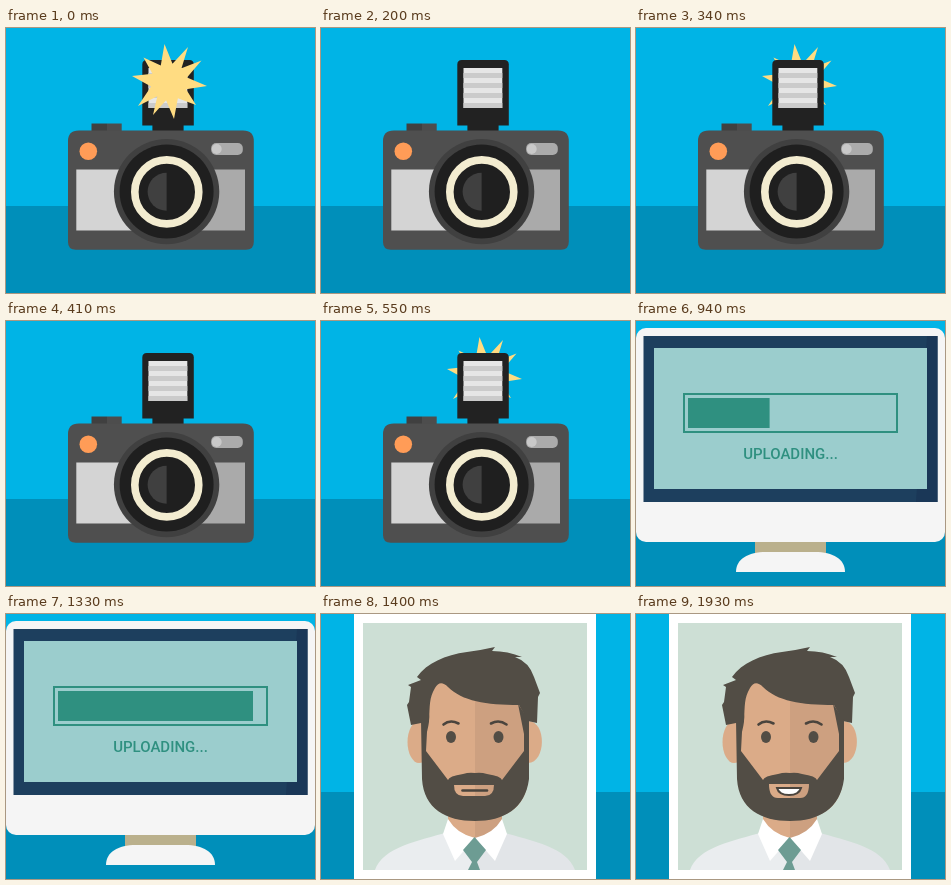
Animation of 309x265 px, one loop 4.1 s. Source, as an HTML page:

```html
<!DOCTYPE html>
<html lang="en">
<head>
<meta charset="utf-8">
<title>Photo upload</title>
<style>
  html, body { margin: 0; width: 100%; height: 100%; overflow: hidden; }
  svg { display: block; width: 100%; height: 100%; }
  text { font: 500 15px Roboto, sans-serif; }
  .line { fill: none; stroke: #4a443d; stroke-width: 2.6; stroke-linecap: round; }
</style>
</head>
<body>
<svg viewBox="0 0 309 265">
  <defs>
    <!-- Two-tone fills that split at x = 154 -->
    <linearGradient id="skin" gradientUnits="userSpaceOnUse" x1="0" x2="308">
      <stop offset=".5" stop-color="#dbab88"/><stop offset=".5" stop-color="#cda080"/>
    </linearGradient>
    <linearGradient id="shirt" gradientUnits="userSpaceOnUse" x1="0" x2="308">
      <stop offset=".5" stop-color="#eaedef"/><stop offset=".5" stop-color="#e2e5e8"/>
    </linearGradient>
  </defs>
  <path fill="#00b4e6" d="M0 0H309V178H0z"/>
  <path fill="#008fba" d="M0 178H309V265H0z"/>

  <g id="camera">
    <polygon class="star" id="starBack" fill="#ffdc82"/>
    <path fill="#222" d="M146.400 92H177.600V104H146.400z"/>
    <path fill="#222" d="M136.300 97.600V36.500Q136.300 32 140.800 32H183.300Q187.800 32 187.800 36.500V97.600z"/>
    <path fill="#e6e6e6" d="M142.500 40H181.300V80H142.500z"/>
    <path fill="#cbcbcb" d="M142.500 45h38.800v5h-38.800zm0 10h38.800v5h-38.800zm0 10h38.800v5h-38.800zm0 10h38.800v5h-38.800z"/>
    <path fill="#404040" d="M85.500 95.500H101V104H85.500z"/>
    <path fill="#4d4d4d" d="M101 95.500H115.700V104H101z"/>
    <path fill="#4f4f4f" d="M62 113Q62 102.400 72.600 102.400H237.200Q247.800 102.400 247.800 113V214Q247.800 221.800 240 221.800H69.800Q62 221.800 62 214z"/>
    <path fill="#d4d4d4" d="M70.300 141.400H160V202.600H70.300z"/>
    <path fill="#aaa" d="M160 141.400H239V202.600H160z"/>
    <circle cx="82.300" cy="123.300" r="8.800" fill="#ff9c57"/>
    <rect x="205.200" y="115" width="31.600" height="12" rx="5" fill="#ababab"/>
    <circle cx="210.700" cy="121" r="5" fill="#c9c9c9"/>
    <circle cx="160.600" cy="163.600" r="52.700" fill="#404040"/>
    <circle cx="160.600" cy="163.600" r="47" fill="#1f1f1f"/>
    <circle cx="160.800" cy="163.900" r="32" fill="#1f1f1f" stroke="#f3ecd0" stroke-width="7.600"/>
    <path fill="#404040" d="M160.600 144.800A19 19 0 0 0 160.600 182.800z"/>
    <polygon class="star" id="starFront" fill="#ffdc82"/>
  </g>

  <g id="monitor">
    <rect y="7" width="309" height="214" rx="10" fill="#f5f5f5"/>
    <path fill="#1d3f5e" d="M7.500 15H301.500V181H7.500z"/>
    <path fill="#1a3757" d="M291 15H301.500V181H280z"/>
    <path fill="#9bcdcd" d="M18 27H291V168H18z"/>
    <path fill="#bab08c" d="M119 221H190V233H119z"/>
    <path fill="#f5f5f5" d="M100 251C100 238 112 231 130 231H179C197 231 209 238 209 251z"/>
    <rect x="48" y="73" width="213" height="38" fill="none" stroke="#2f9080" stroke-width="2"/>
    <rect id="bar" x="52" y="77" height="30" fill="#2f9080"/>
    <text x="154.500" y="138" text-anchor="middle" fill="#2f9080">UPLOADING...</text>
  </g>

  <g id="portrait">
    <path fill="#fff" d="M33 0H275V265H33z"/>
    <path fill="#cddfd5" d="M42 9H266V256H42z"/>
    <path fill="url(#shirt)" d="M54 256C62 233 97 227 127 218H181C211 227 246 233 254 256z"/>
    <path fill="url(#skin)" d="M127 190H181V212L154 226L127 212z"/>
    <path fill="#fff" d="M127 205L122 220L134 247L154 224Q136 220 127 205zM181 205L186 220L174 247L154 224Q172 220 181 205z"/>
    <path fill="#6d9c93" d="M153.500 223L165 236L156 248L159 256H147L151 248L142 236z"/>
    <g fill="url(#skin)">
      <ellipse cx="98" cy="128" rx="11.500" ry="21"/>
      <path fill="#dbab88" d="M207 107C226 107 225 149 207 149z"/>
      <path d="M102 60H207V165C205 195 183 206 154 206C125 206 103 195 102 165z"/>
    </g>
    <g fill="#524d45">
      <path d="M90 111L86 91L88 88L90 73L87 71L100 66L96 63C106 49 124 41 146 38Q161 36 174 33L171 37Q187 37 201 43L194 43Q208 48 213 63L219 79L217 83L216 109L207 107L198 91C165 91 141 87 127 73Q119 65 114 74C108 84 109 92 108 106L100 109z"/>
      <path d="M100 106L108 100Q109 106 106 118L105 137L127 166Q128 162 142 160Q148 158 154 159Q160 158 166 160Q180 162 181 166L203 137L203 120L197 90L208 106V165C204 195 183 207 154 207C125 207 103 195 101 165z"/>
      <ellipse cx="130" cy="123" rx="5" ry="6"/>
      <ellipse cx="177.500" cy="123" rx="5" ry="6"/>
    </g>
    <path class="line" d="M122.500 110.500Q129 105 137.500 109.500M170 109.500Q178 105 185.500 110.500"/>
    <g id="neutral">
      <path fill="url(#skin)" d="M133 171H173Q173 182 164 182H142Q133 182 133 171z"/>
      <path class="line" d="M141.500 176.500H166"/>
    </g>
    <g id="smile">
      <path fill="url(#skin)" d="M133 170H173Q173 184 164 184H142Q133 184 133 170z"/>
      <path class="line" style="fill:#fff;stroke-width:2" d="M141 174H165Q163 181 153 181Q143 181 141 174z"/>
    </g>
  </g>
</svg>
<script>
const $ = id => document.getElementById(id);
const show = (id, on) => { $(id).style.display = on ? '' : 'none'; };

const LOOP = 4100, UPLOAD = 680, PHOTO = 1400, SMILE = 1930;
const center = [163, 54], valley = 18.5;
const tips = [[158.5, 16], [182, 19], [195.5, 32.5], [201, 58], [190, 77],
              [168, 91], [147, 87], [132, 78], [126, 48], [137.5, 29.5]];

// Place a valley halfway between each pair of neighbouring tips.
const angle = ([x, y]) => Math.atan2(y - center[1], x - center[0]);
const outline = tips.flatMap((tip, i) => {
  const a = angle(tip);
  const gap = (angle(tips[(i + 1) % tips.length]) - a + 2 * Math.PI) % (2 * Math.PI);
  const mid = a + gap / 2;
  return [tip, [center[0] + valley * Math.cos(mid), center[1] + valley * Math.sin(mid)]];
});
document.querySelectorAll('.star').forEach(s => s.setAttribute('points', outline.join(' ')));

function draw(now) {
  const t = now % LOOP;
  show('camera', t < UPLOAD);
  show('monitor', t >= UPLOAD && t < PHOTO);
  show('portrait', t >= PHOTO);

  // The flash cycles: in front, behind, off.
  const flash = t < 130 ? 0 : Math.min(7, 1 + Math.floor((t - 130) / 70)) % 3;
  show('starFront', flash === 0);
  show('starBack', flash === 1);

  const step = Math.max(0, Math.min(5, Math.floor((t - UPLOAD) / 130)));
  $('bar').setAttribute('width', 6 + 37.8 * step);

  show('neutral', t < SMILE);
  show('smile', t >= SMILE);
}

let start;
function tick(now) {
  start ??= now;
  draw(now - start);
  requestAnimationFrame(tick);
}
draw(0);
requestAnimationFrame(tick);
</script>
</body>
</html>
```
